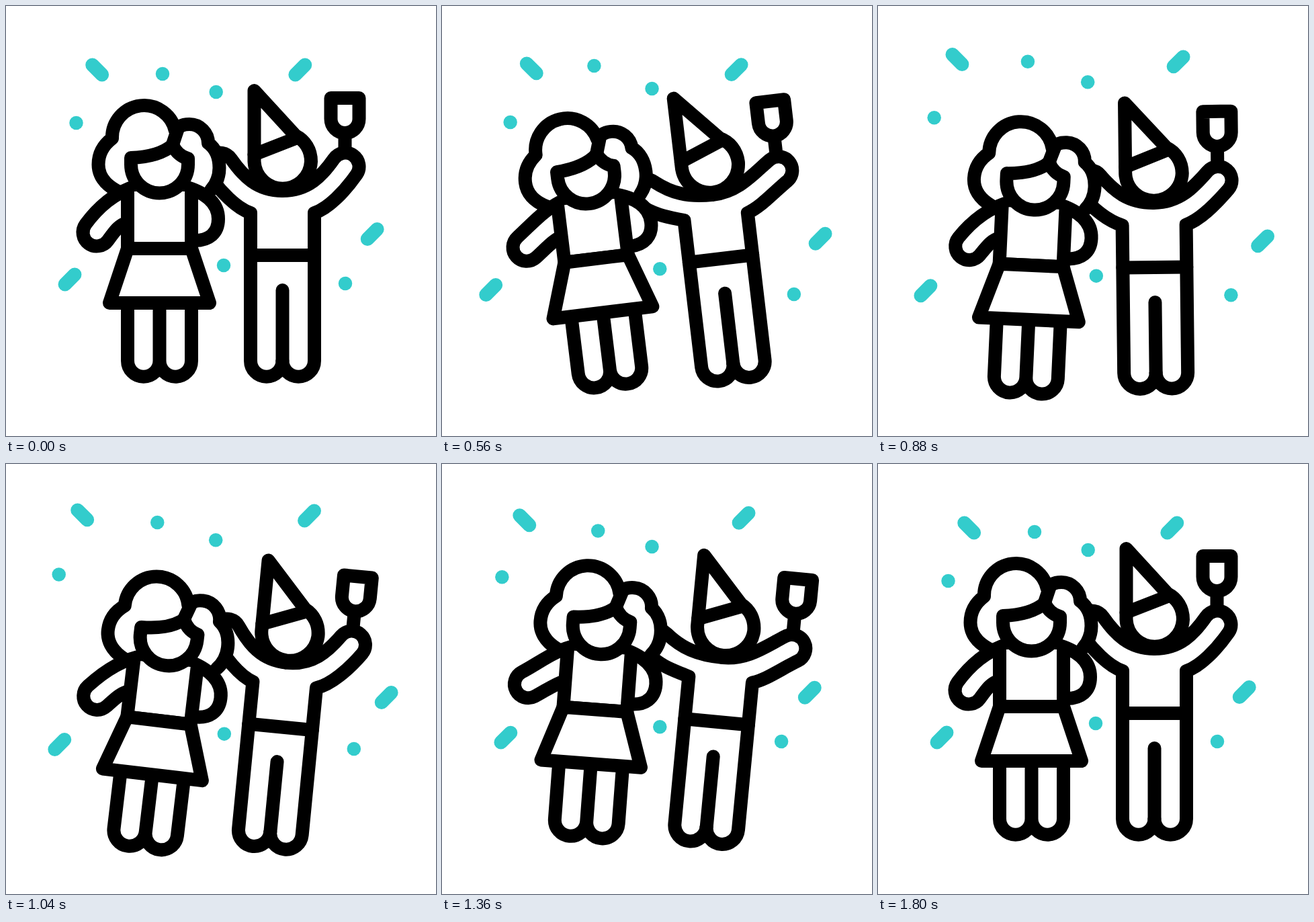
An HTML page for the animation above (1840 ms loop, 640 by 640 pixels).

```html
<!DOCTYPE html>
<html lang="en">
<head>
<meta charset="utf-8">
<title>Party couple</title>
<style>
  html, body { margin: 0; width: 100%; height: 100%; overflow: hidden; background: #fff; }
  svg { display: block; width: 100vw; height: 100vh; }
  .ink { fill: #fff; stroke: #000; stroke-width: 20; stroke-linecap: round; stroke-linejoin: round; }
  .line { fill: none; }
  #confetti { stroke: #33cccc; stroke-width: 20.5; stroke-linecap: round; }
</style>
</head>
<body>
<svg viewBox="0 0 640 640">
  <g id="confetti"></g>

  <g id="man" class="ink">
    <g id="glass">
      <path d="M504.5 189V222"/>
      <path d="M483.5 137H525.5V168a21 21 0 0 1 -42 0Z"/>
    </g>
    <path id="leftHalf" transform="matrix(-1 0 0 1 823 0)"/>
    <path id="rightHalf"/>
    <path class="line" d="M411.5 423V528M364 371H459"/>
    <path d="M369.5 126V231.5A42.3 42.3 0 0 0 454 231.5C454 214 445 200 431 193Z"/>
    <path class="line" d="M369.5 221L431 197"/>
  </g>

  <g id="woman" class="ink">
    <path d="M181 442V528a23.75 23.75 0 0 0 47.5 0a23.75 23.75 0 0 0 47.5 0V442M228.5 442V528"/>
    <path d="M165 275C146 265 137.5 251 137.5 236C137.5 219 146 206 158 197A47.5 47.5 0 0 1 252 186C256 179 264 176 273 176A28 28 0 0 1 301 204C312 212 317.5 226 317.5 241C317.5 254 313 265 305 274"/>
    <path id="arm"/>
    <path d="M263 268C300 278 316 295 316 317C316 338 302 349 281 349"/>
    <path d="M181 276V361H276V276"/>
    <path d="M181 361H276L303 442H154Z"/>
    <path d="M186 226V236A42.5 42.5 0 0 0 271 236V227C262 225 253 218 248 207C233 220 212 225 186 226Z"/>
    <path class="line" d="M255 185L248 206"/>
  </g>
</svg>
<script>
const LOOP = 1840, STEP = 40, HAND = 20.5;
const $ = id => document.getElementById(id);
const set = (id, name, value) => $(id).setAttribute(name, value);
const mix = (a, b, u) => a + (b - a) * u;

// Sine ease from 0 to 1 between two times.
const ease = (t, from, to) => {
  const u = Math.min(1, Math.max(0, (t - from) / (to - from)));
  return (1 - Math.cos(Math.PI * u)) / 2;
};
// Up to 1 at the peak and back to 0.
const bump = (t, peak, span) => ease(span - Math.abs(t - peak), 0, span);
// Lean left, lean right, then upright.
const sway = (t, start, left, right, end) =>
  7.15 * (2 * ease(t, left, right) - ease(t, start, left) - ease(t, right, end));

// Curve from the neck round a hand and back to the armpit; side mirrors the hand.
function limb({ neck, armpit, back, side }, x, y, deg) {
  const a = deg * Math.PI / 180, dx = Math.cos(a), dy = Math.sin(a);
  const nx = side * dy * HAND, ny = -side * dx * HAND;
  const [upper, lower] = back;
  return `M${neck} ${x + nx - dx * upper} ${y + ny - dy * upper} ${x + nx} ${y + ny}` +
    `A${HAND} ${HAND} 0 0 ${side > 0 ? 1 : 0} ${x - nx} ${y - ny}` +
    `C${x - nx - dx * lower} ${y - ny - dy * lower} ${armpit}`;
}

const manArm = { neck: '411.5 275C450 275', armpit: '480 301 459 308', back: [31, 31], side: 1 };
const womanArm = { neck: '194 268C162 277', armpit: '168 326 181 322', back: [30, 19], side: -1 };

// A man's half: arm, flank and one leg.
const half = (x, y, deg) => limb(manArm, x, y, deg) + 'V528A23.75 23.75 0 0 1 411.5 528';

// Confetti flies out from the middle and returns.
const bits = [];
function bit(x, y, peak, slant = 0) {
  const el = document.createElementNS('http://www.w3.org/2000/svg', 'path');
  const r = slant ? 7.2 : 0.01;
  el.setAttribute('d', `M${x - r} ${y - r * slant}L${x + r} ${y + r * slant}`);
  $('confetti').append(el);
  bits.push({ el, peak, dx: (x - 317) * 0.122, dy: (y - 253) * 0.122 });
}
bit(135.7, 95, 1070, 1);
bit(437.8, 95, 1150, -1);
bit(95, 407, 740, -1);
bit(545.2, 339.5, 825, -1);
bit(233, 101, 825);
bit(312.7, 128, 960);
bit(104.5, 174, 1070);
bit(324, 386, 960);
bit(505, 413, 740);

const place = (id, x, y, drop, turn) =>
  set(id, 'transform', `translate(0 ${drop}) rotate(${turn} ${x} ${y})`);

function draw(t) {
  place('woman', 228.5, 352, 25 * bump(t, 860, 690), sway(t, 20, 520, 1100, 1700));
  place('man', 411.5, 341, 20.5 * bump(t, 1050, 740), sway(t, 140, 640, 1150, 1800));

  const wave = bump(t, 450, 450) + bump(t, 1350, 450);
  set('arm', 'd', limb(womanArm, mix(135, 126.5, wave), mix(337, 331, wave), mix(126, 148, wave)));

  const reach = bump(t, 640, 370) + bump(t, 1400, 370);
  set('rightHalf', 'd', half(mix(505, 513, reach), mix(239, 252, reach), mix(-55, -31, reach)));
  set('leftHalf', 'd', half(mix(505, 511, reach), mix(239, 264, reach), mix(-55, -38, reach)));
  set('glass', 'transform', `translate(${8 * reach} ${11 * reach})`);

  for (const { el, peak, dx, dy } of bits) {
    const u = bump(t, peak, 650);
    el.setAttribute('transform', `translate(${dx * u} ${dy * u})`);
  }
}

const start = performance.now();
function tick() {
  const t = (performance.now() - start) % LOOP;
  draw(Math.floor(t / STEP) * STEP);
  requestAnimationFrame(tick);
}
tick();
</script>
</body>
</html>
```
